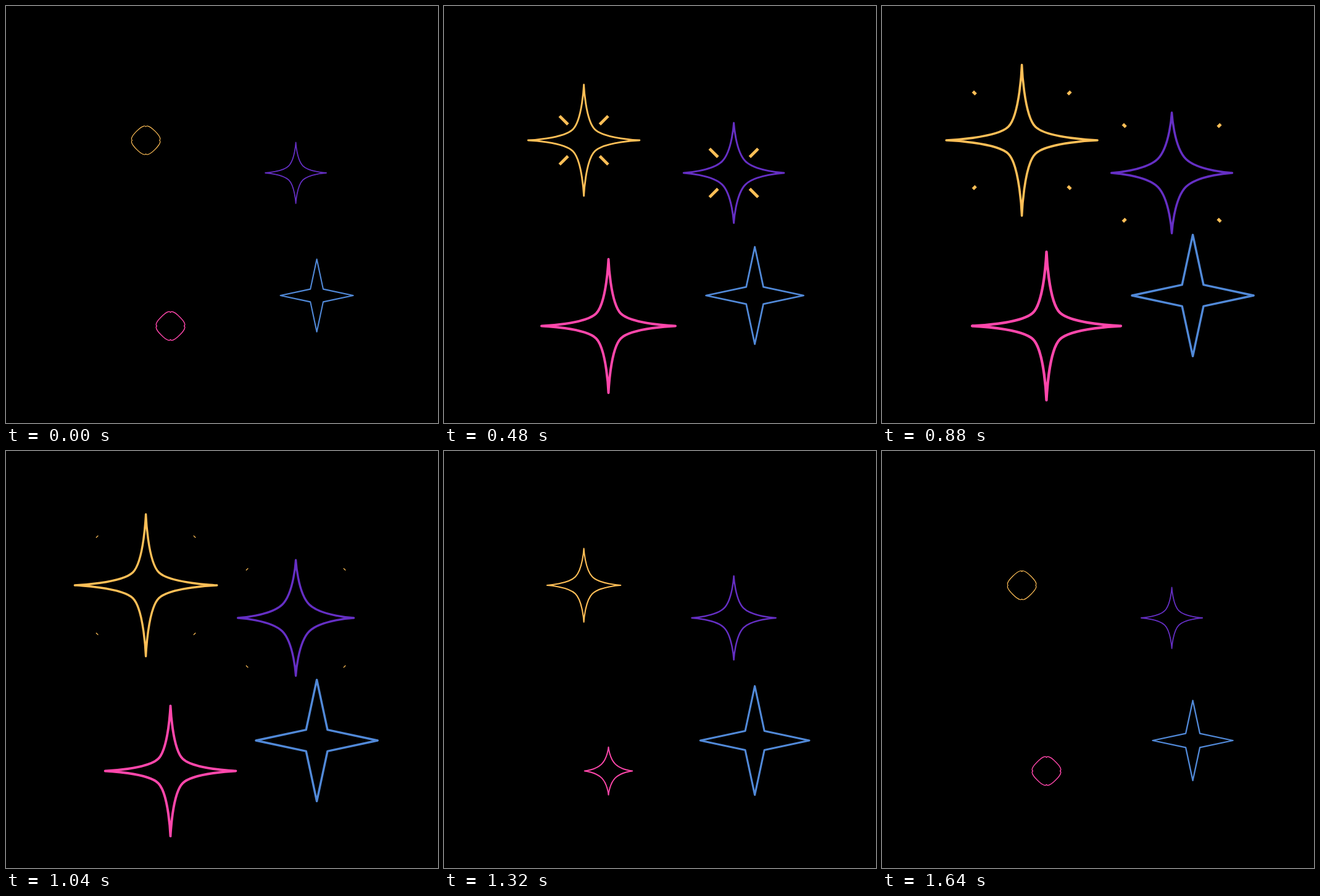
Recreate the animation shown at these times as an HTML page. Size 700 by 677 pixels, loop 1680 ms.

```html
<!DOCTYPE html>
<html lang="en">
<head>
<meta charset="utf-8">
<title>Sparkles</title>
<style>
  html, body { margin: 0; width: 100%; height: 100%; overflow: hidden; background: #000; }
  svg { display: block; width: 100%; height: 100%; }
  path { fill: none; stroke-linejoin: round; }
</style>
</head>
<body>
<svg viewBox="0 0 700 677" xmlns="http://www.w3.org/2000/svg">
  <g transform="translate(503.6 470)"><path id="blue" stroke="#5189d8"/></g>
  <g transform="translate(469.6 271)">
    <path class="rays" stroke="#ffbf57" stroke-width="4.8"/>
    <path id="purple" stroke="#652fc4"/>
  </g>
  <g transform="translate(266.5 519.5)"><path id="pink" stroke="#ff47ab"/></g>
  <g transform="translate(226.6 218)">
    <path class="rays" stroke="#ffbf57" stroke-width="4.8"/>
    <path id="yellow" stroke="#ffbf57"/>
  </g>
</svg>
<script>
const STEP = 40, FRAMES = 42;
const ROUND = 0.86; // inner handle length relative to the corner offset
const $ = id => document.getElementById(id);
const rays = document.querySelectorAll('.rays');
const clamp = x => Math.min(1, Math.max(0, x));

// Timing curve with control points (x1, 0) and (x2, 1)
function ease(x, [x1, x2]) {
  x = clamp(x);
  let lo = 0, hi = 1;
  for (let i = 0; i < 24; i++) {
    const t = (lo + hi) / 2, u = 1 - t;
    if (3 * u * u * t * x1 + 3 * u * t * t * x2 + t * t * t < x) lo = t;
    else hi = t;
  }
  return lo * lo * (3 - 2 * lo);
}

// Grows during [a, b], shrinks during [c, d]
function pulse(f, [a, b, c, d], up, down) {
  return f < c ? ease((f - a) / (b - a), up) : 1 - ease((f - c) / (d - c), down);
}

// Four-pointed star: tip distance, inner corner offset, corner roundness
function star(tip, inner, round) {
  const k = inner * round;
  let d = '';
  for (let q = 0; q < 4; q++) {
    const c = [1, 0, -1, 0][q], s = [0, 1, 0, -1][q];
    const p = (x, y) => (x * c - y * s).toFixed(2) + ' ' + (x * s + y * c).toFixed(2) + ' ';
    d += (q ? '' : 'M' + p(tip, 0)) +
      'C' + p(tip, 0) + p(inner + k, inner - k) + p(inner, inner) +
      'C' + p(inner - k, inner + k) + p(0, tip) + p(0, tip);
  }
  return d + 'Z';
}

function draw(id, d, width) {
  $(id).setAttribute('d', d);
  $(id).setAttribute('stroke-width', width.toFixed(2));
}

// Star that swells out of a small rounded blob
function bloom(id, e, w0, w1) {
  const tip = 22 + 100.7 * e;
  const blob = Math.max(0, (42 - tip) / 20) ** 2;
  draw(id, star(tip, 6 + 0.13 * tip + 6 * blob, ROUND), w0 + (w1 - w0) * e);
}

function rayPath(f) {
  if (f <= 9 || f > 28) return '';
  const out = (start, len) => 1 - (1 - clamp((f - start) / len)) ** 3;
  const a = 79 * out(9.5, 20.3), b = 79.4 * out(9, 14.7);
  return [[1, 1], [-1, 1], [-1, -1], [1, -1]]
    .map(([x, y]) => `M${x * a} ${y * a}L${x * b} ${y * b}`).join('');
}

function render(ms) {
  const f = Math.floor(ms / STEP) % FRAMES;
  bloom('yellow', pulse(f, [0, 20.6, 21, 42], [0.61, 0.41], [0.58, 0.46]), 1.2, 3.6);
  bloom('pink', pulse(f, [0, 18.5, 19, 40], [0.46, 0.35], [0.6, 0.4]), 1.4, 4.4);

  const p = 49.5 + 48.5 * pulse(f, [0, 21, 21, 42], [0.45, 0.51], [0.54, 0.5]);
  draw('purple', star(p, 0.232 * p, ROUND), 0.036 * p);

  const b = 59 + 40 * pulse(f, [0, 24, 24, 48], [0.5, 0.5], [0.5, 0.5]);
  draw('blue', star(b, 0.176 * b, 0), 0.035 * b);

  const d = rayPath(f);
  rays.forEach(r => r.setAttribute('d', d));
}

const begin = performance.now();
function tick() {
  render(performance.now() - begin);
  requestAnimationFrame(tick);
}
tick();
</script>
</body>
</html>
```
